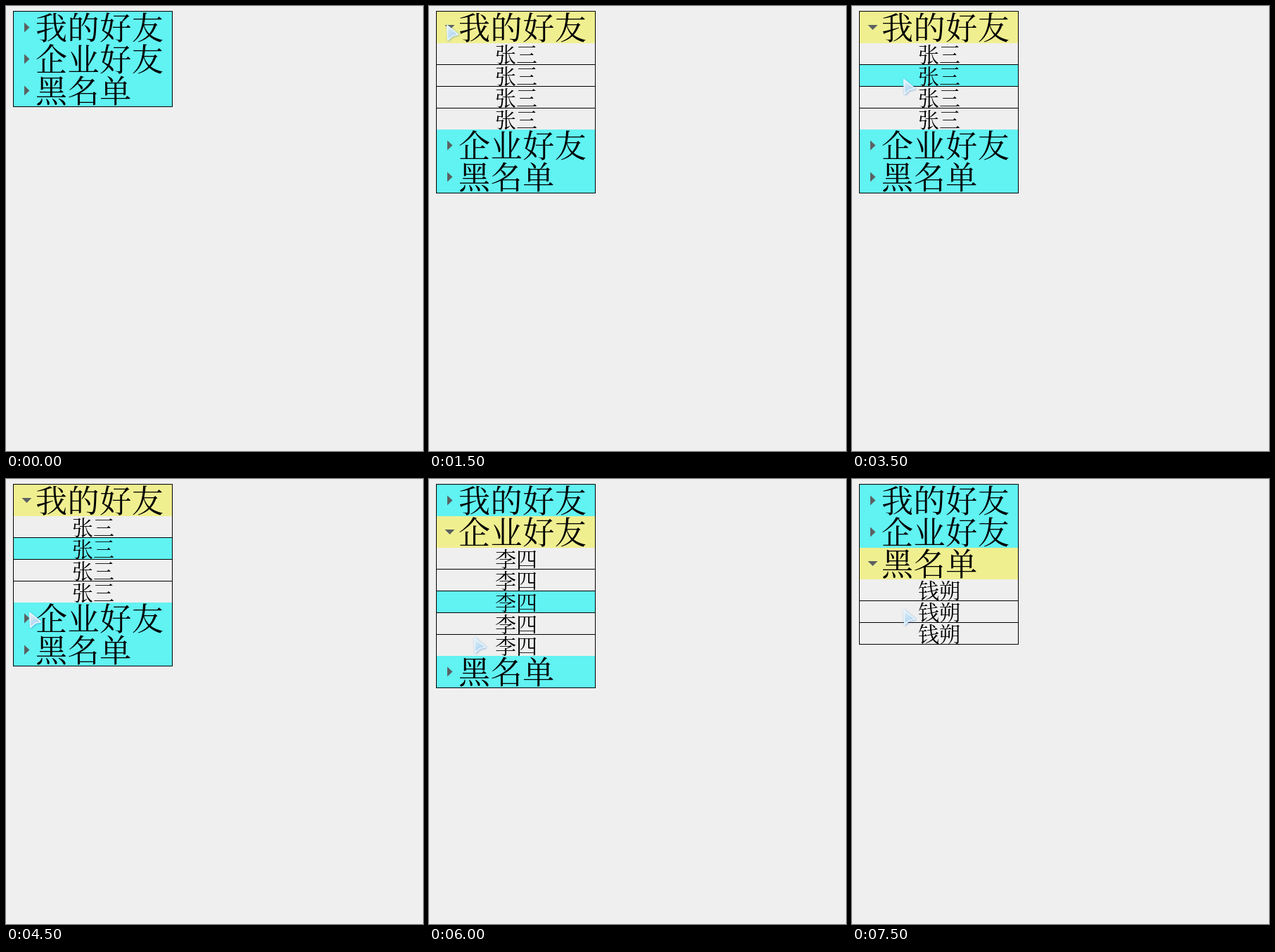
An HTML page with a canvas that plays this animation: 593 px wide and 634 px high, repeating every 8000 ms.

```html
<!DOCTYPE html>
<html lang="zh-CN">
<head>
<meta charset="utf-8">
<title>好友列表</title>
<style>
  html, body { margin: 0; width: 100%; height: 100%; overflow: hidden; background: #efefef; }
  canvas { display: block; }
</style>
</head>
<body>
<canvas id="stage" width="593" height="634"></canvas>
<script>
const ctx = document.getElementById('stage').getContext('2d');
const FONT = '"Noto Serif CJK SC", "Noto Sans CJK SC", "Noto Sans CJK", serif';
const CYAN = '#61f2f2', YELLOW = '#f0ef90', PAPER = '#efefef', INK = '#000';
const LEFT = 11, WIDTH = 225, TOP = 8, HEAD = 45, ITEM = 30;
const STEP = 500, LOOP = 8000;

const groups = [
  { title: '我的好友', name: '张三', count: 4 },
  { title: '企业好友', name: '李四', count: 5 },
  { title: '黑名单', name: '钱朔', count: 3 }
];

// Pointer tip for each half second; null while it is off the stage.
const pointer = [
  null, [61, 21], [75, 111], [26, 28],
  [158, 140], [120, 60], [74, 105], [74, 105],
  [50, 182], [34, 191], [34, 191], [95, 165],
  [65, 227], [30, 273], [26, 273], [74, 187]
];

// Each entry holds from its time until the next one.
const clicks = [
  { at: 0, open: -1, picked: -1 },
  { at: 1500, open: 0, picked: -1 },
  { at: 2500, open: 0, picked: 0 },
  { at: 3500, open: 0, picked: 1 },
  { at: 5000, open: 1, picked: -1 },
  { at: 5500, open: 1, picked: 2 },
  { at: 7500, open: 2, picked: -1 }
];

function fill(color, x, y, w, h) {
  ctx.fillStyle = color;
  ctx.fillRect(x, y, w, h);
}

function trace(points) {
  ctx.beginPath();
  for (const [x, y] of points) ctx.lineTo(x, y);
  ctx.closePath();
}

function label(text, x, y, size, weight, spacing) {
  ctx.font = `${weight} ${size}px ${FONT}`;
  ctx.letterSpacing = spacing + 'px';
  ctx.fillStyle = INK;
  ctx.fillText(text, x, y);
}

function drawHead(title, y, open) {
  fill(open ? YELLOW : CYAN, LEFT, y, WIDTH, HEAD);
  trace(open
    ? [[22.5, y + 19], [36.5, y + 19], [29.5, y + 26]]
    : [[26, y + 15.5], [33.5, y + 22.5], [26, y + 29.5]]);
  ctx.fillStyle = '#5b6161';
  ctx.fill();
  label(title, 42, y + 40, 45, 400, 0.6);
}

function drawItem(name, y, picked, last) {
  fill(picked ? CYAN : PAPER, LEFT, y, WIDTH, ITEM);
  if (!last) fill(INK, LEFT, y + ITEM, WIDTH, 1);
  label(name, 94, y + 27, 30, 300, 0);
}

function drawPointer([x, y]) {
  ctx.save();
  ctx.translate(x, y);
  trace([[0, 0], [15, 12.5], [7.5, 14], [1, 20]]);
  ctx.lineJoin = 'round';
  ctx.shadowColor = 'rgba(70, 140, 205, 0.7)';
  ctx.shadowBlur = 3;
  ctx.shadowOffsetX = ctx.shadowOffsetY = 0.7;
  ctx.lineWidth = 2;
  ctx.strokeStyle = '#eaf5fd';
  ctx.stroke();
  ctx.shadowColor = 'transparent';
  const shade = ctx.createLinearGradient(0, 2, 8, 16);
  shade.addColorStop(0, '#e2eff8');
  shade.addColorStop(1, '#acd5f0');
  ctx.fillStyle = shade;
  ctx.fill();
  ctx.lineWidth = 1.2;
  ctx.stroke();
  ctx.restore();
}

function draw(time) {
  const { open, picked } = clicks.filter(c => c.at <= time).pop();
  fill(PAPER, 0, 0, 593, 634);
  let y = TOP;
  groups.forEach((group, g) => {
    drawHead(group.title, y, g === open);
    y += HEAD;
    if (g !== open) return;
    for (let i = 0; i < group.count; i++) {
      const last = i === group.count - 1;
      drawItem(group.name, y, i === picked, last);
      y += last ? ITEM : ITEM + 1;
    }
  });
  ctx.lineWidth = 1;
  ctx.strokeStyle = INK;
  ctx.strokeRect(LEFT - 0.5, TOP - 0.5, WIDTH + 1, y - TOP + 1);
  const tip = pointer[Math.floor(time / STEP)];
  if (tip) drawPointer(tip);
}

const start = performance.now();
function tick() {
  draw((performance.now() - start) % LOOP);
  requestAnimationFrame(tick);
}
tick();
</script>
</body>
</html>
```
